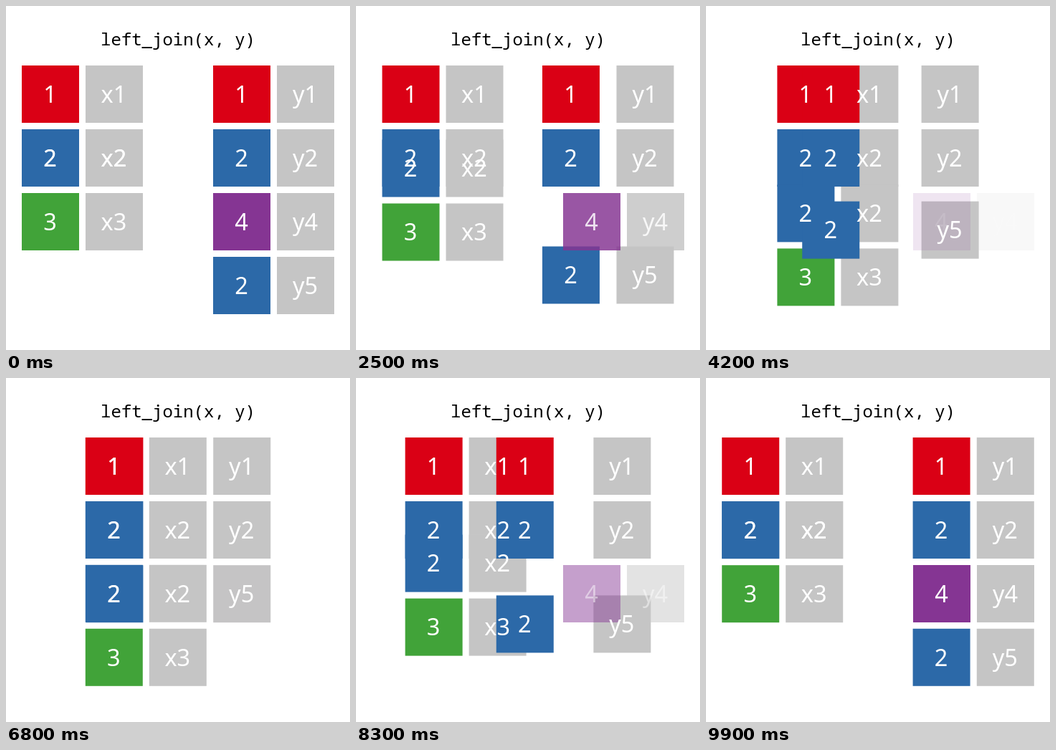
Recreate the animation shown at these times as an HTML page. Size 480 px wide and 480 px high, loop 10 s.

```html
<!DOCTYPE html>
<html lang="en">
<head>
<meta charset="utf-8">
<title>Left join</title>
<style>
  html, body { margin: 0; width: 100%; height: 100%; overflow: hidden; background: #fff; }
  svg { display: block; width: 100%; height: 100%; }
  text { text-anchor: middle; }
  .title { font: 24px "Noto Sans Mono", "DejaVu Sans Mono", monospace; }
  .label { font: 32.5px "Noto Sans", "Open Sans", sans-serif; fill: #fff; }
</style>
</head>
<body>
<svg viewBox="0 0 480 480">
  <text class="title" x="240" y="55.3">left_join(x, y)</text>
  <g id="tiles"></g>
  <g id="labels"></g>
</svg>
<script>
const LOOP = 10000, STEP = 100;
const LEFT = 22, TOP = 83, PITCH = 89, SIZE = 80;
const RED = '#da0015', BLUE = '#2c69a8', GREEN = '#41a339', PURPLE = '#853593', GREY = '#c5c5c5';

// label, colour, start [column, row], end [column, row]; no end means the cell fades out
const cells = [
  ['1', RED, [0, 0], [1, 0]],
  ['2', BLUE, [0, 1], [1, 1]],
  ['2', BLUE, [0, 1], [1, 2]],
  ['3', GREEN, [0, 2], [1, 3]],
  ['x1', GREY, [1, 0], [2, 0]],
  ['x2', GREY, [1, 1], [2, 1]],
  ['x2', GREY, [1, 1], [2, 2]],
  ['x3', GREY, [1, 2], [2, 3]],
  ['1', RED, [3, 0], [1, 0]],
  ['2', BLUE, [3, 1], [1, 1]],
  ['2', BLUE, [3, 3], [1, 2]],
  ['y1', GREY, [4, 0], [3, 0]],
  ['y2', GREY, [4, 1], [3, 1]],
  ['y5', GREY, [4, 3], [3, 2]],
  ['4', PURPLE, [3, 2]],
  ['y4', GREY, [4, 2]]
];

function add(parent, name, attrs) {
  const el = document.createElementNS('http://www.w3.org/2000/svg', name);
  for (const key in attrs) el.setAttribute(key, attrs[key]);
  return document.getElementById(parent).appendChild(el);
}

const items = cells.map(([label, fill, from, to]) => {
  const tile = add('tiles', 'rect', { width: SIZE, height: SIZE, fill });
  const text = add('labels', 'text', { class: 'label', x: 39.5, y: 51.8 });
  text.textContent = label;
  return { parts: [tile, text], from, to };
});

const ease = p => (1 - Math.cos(Math.PI * p)) / 2;
const mix = (a, b, k) => a + (b - a) * k;

// 0 = separate tables, 1 = joined
function progress(t) {
  if (t < 1600) return 0;
  if (t < 5000) return ease((t - 1600) / 3400);
  if (t < 6700) return 1;
  return 1 - ease((t - 6700) / 3300);
}

function draw(k) {
  for (const { parts, from, to } of items) {
    const end = to || from;
    const x = LEFT + PITCH * mix(from[0], end[0], k);
    const y = TOP + PITCH * mix(from[1], end[1], k);
    for (const el of parts) {
      el.setAttribute('transform', `translate(${x} ${y})`);
      if (!to) el.setAttribute('fill-opacity', 1 - k);
    }
  }
}

function tick() {
  const t = performance.now() % LOOP;
  draw(progress(Math.floor(t / STEP) * STEP));
  requestAnimationFrame(tick);
}
tick();
</script>
</body>
</html>
```
